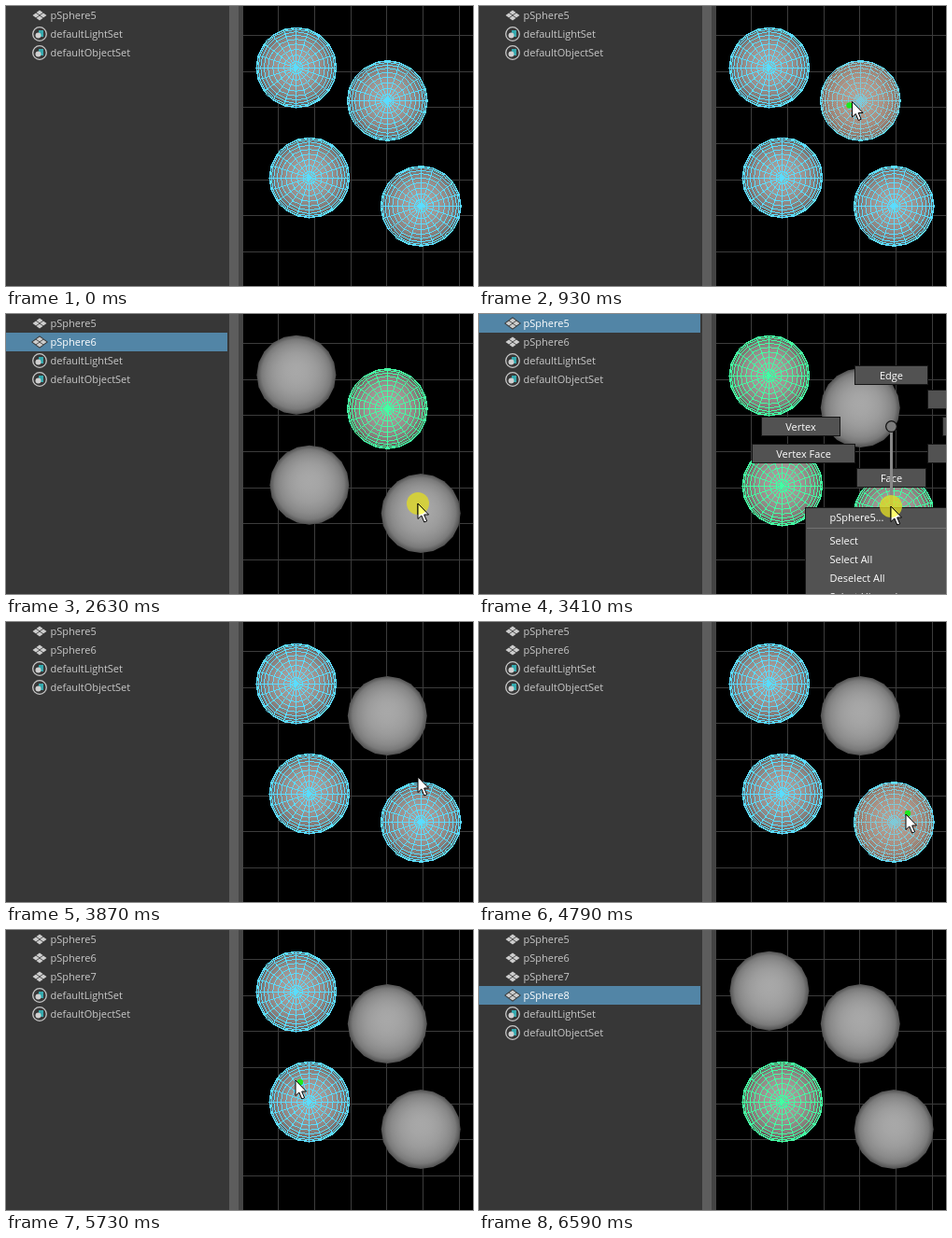
An HTML page with a canvas for the animation above (8610 ms loop, 500 by 300 pixels).

```html
<!DOCTYPE html>
<html lang="en">
<head>
<meta charset="utf-8">
<title>Extracting spheres</title>
<style>
html, body { margin: 0; width: 100%; height: 100%; overflow: hidden; background: #000; }
canvas { display: block; }
</style>
</head>
<body>
<canvas id="stage" width="500" height="300"></canvas>
<script>
const ctx = document.getElementById('stage').getContext('2d');
const LOOP = 8610, TAU = Math.PI * 2, SIDES = 20, RADIUS = 43;
const BLUE = '#5bdcff', GREEN = '#43ffa3', SELECT = '#5285a6', EDGE = '#161616';

// Each round: enter component mode, hover a face, pick the shell, extract it.
const ROUNDS = [
  { ball: 1, mode: 0, hover: 620, pick: 860, pull: 1620, spot: [-3, 4] },
  { ball: 3, mode: 3870, hover: 4100, pick: 4400, pull: 4870, spot: [2, -1] },
  { ball: 2, mode: 5640, hover: 5640, pick: 5890, pull: 6590, spot: [5, 2] }
];
const RESELECT = 2700, MENU_OPEN = 3090, MENU_CLOSE = 3870;

const MOVES = [
  { start: 380, end: 620, from: [489, 130], to: [399.5, 102.5] },
  { start: 2320, end: 2460, from: [489, 212], to: [441, 203] },
  { start: 3410, end: 3730, from: [441, 206], to: [441, 166] },
  { start: 3870, end: 4100, from: [441, 166], to: [457, 206] },
  { start: 5190, end: 5410, from: [247, 190], to: [302, 176] },
  { start: 5640, end: 5710, from: [306, 168], to: [310, 161] },
  { start: 6040, end: 6110, from: [310, 178], to: [310, 195] }
];
const PRESSES = [[790, 930], [2630, 2700], [3010, 3870], [4250, 4480], [5810, 5890]];

const mix = (a, b, u) => a + (b - a) * u;

function box(x, y, w, h, fill) {
  ctx.fillStyle = fill;
  ctx.fillRect(x, y, w, h);
}

function disc(x, y, r, fill) {
  ctx.beginPath();
  ctx.arc(x, y, r, 0, TAU);
  ctx.fillStyle = fill;
  ctx.fill();
}

function label(text, x, y, fill, align = 'left') {
  ctx.font = '11px "Open Sans", sans-serif';
  ctx.textAlign = align;
  ctx.fillStyle = fill;
  ctx.fillText(text, x, y);
}

function poly(points) {
  ctx.beginPath();
  for (const [x, y] of points) ctx.lineTo(x, y);
  ctx.closePath();
}

const corner = (cx, cy, r, i) => {
  const a = i * TAU / SIDES;
  return [cx + r * Math.cos(a), cy + r * Math.sin(a)];
};

// Hard-edged line of whole pixels
function pixelLine(path, [x0, y0], [x1, y1]) {
  const n = Math.ceil(Math.max(Math.abs(x1 - x0), Math.abs(y1 - y0))) || 1;
  for (let i = 0; i <= n; i++)
    path.rect(Math.floor(mix(x0, x1, i / n)), Math.floor(mix(y0, y1, i / n)), 1, 1);
}

function wirePath(x, y) {
  const path = new Path2D();
  for (let i = 0; i < SIDES; i++) {
    pixelLine(path, [x, y], corner(x, y, RADIUS, i));
    for (let k = 1; k <= 10; k++) {
      const r = RADIUS * Math.sin(k * TAU / 40);
      pixelLine(path, corner(x, y, r, i), corner(x, y, r, i + 1));
    }
  }
  return path;
}

function stipplePath(cx, cy) {
  const path = new Path2D(), x0 = Math.round(cx), y0 = Math.round(cy);
  for (let dy = -RADIUS; dy < RADIUS; dy++)
    for (let dx = -RADIUS; dx < RADIUS; dx++)
      if ((dx + dy) % 2 === 0 && Math.hypot(dx, dy) < RADIUS - 1) path.rect(x0 + dx, y0 + dy, 1, 1);
  return path;
}

const BALLS = [[310.9, 66], [408.3, 101.4], [324.9, 184], [444.2, 214.4]]
  .map(([x, y]) => ({ x, y, wire: wirePath(x, y), stipple: stipplePath(x, y) }));

function drawBall({ x, y, wire, stipple }, look) {
  const plain = look === 'plain';
  const cy = plain ? y - 0.8 : y, r = plain ? 42.5 : RADIUS;
  const shade = ctx.createRadialGradient(x, cy - 5, 0, x, cy, r);
  for (let d = 0; d <= 1; d += 0.125) {
    const v = 78 + 90 * Math.sqrt(1 - d * d);
    shade.addColorStop(d, plain ? `rgb(${v},${v},${v})` : `rgb(${v},${v - 8},${v - 11})`);
  }
  poly(Array.from({ length: SIDES }, (_, i) => corner(x, cy, r, i)));
  ctx.fillStyle = shade;
  ctx.fill();
  if (plain) return;
  ctx.fillStyle = look === 'object' ? GREEN : BLUE;
  ctx.fill(wire);
  if (look === 'picked') {
    ctx.fillStyle = 'rgba(222,150,108,.55)';
    ctx.fill(stipple);
  }
}

function meshIcon(y) {
  const diamond = (x, c, w, h, fill) => {
    poly([[x - w, c], [x, c - h], [x + w, c], [x, c + h]]);
    ctx.fillStyle = fill;
    ctx.fill();
  };
  diamond(36, y, 9, 6.8, '#373737');
  for (const [dx, dy] of [[0, -3], [-4, 0], [4, 0], [0, 3]])
    diamond(36 + dx, y + dy, 3.5, 2.6, '#cdcdcd');
}

function setIcon(y) {
  ctx.beginPath();
  ctx.arc(36, y, 7.3, 0, TAU);
  ctx.strokeStyle = '#c8c8c8';
  ctx.lineWidth = 1.3;
  ctx.stroke();
  box(35, y - 4, 5, 7, '#35a9ae');
  disc(34.5, y + 1.5, 3, '#d0d0d0');
}

function outliner(meshes, selected) {
  box(0, 0, 239, 300, '#373737');
  box(239, 0, 10, 300, '#5d5d5d');
  box(249, 0, 5, 300, '#444');
  const names = Array.from({ length: meshes }, (_, i) => 'pSphere' + (5 + i));
  names.push('defaultLightSet', 'defaultObjectSet');
  names.forEach((name, i) => {
    const y = i * 20 + 10;
    if (i === selected) box(0, y - 10, 237, 20, SELECT);
    (i < meshes ? meshIcon : setIcon)(y);
    label(name, 47.5, y + 4, i === selected ? '#fff' : '#c8c8c8');
  });
}

function grid() {
  box(254, 0, 246, 300, '#000');
  for (let i = 0; i < 7; i++) {
    box(Math.round(291 + i * 38.75), 0, 1, 300, '#3c3c3c');
    box(254, Math.floor(31.3 + i * 38.7), 246, 1, '#3c3c3c');
  }
}

function item(text, x, y, w, fill = '#525252') {
  box(x - 1, y - 1, w + 2, 21, EDGE);
  box(x, y, w, 19, fill);
  label(text, x + w / 2, y + 14, '#fff', 'center');
}

function markingMenu(tipY) {
  item('Edge', 403, 56, 77);
  item('Vertex', 303, 111, 83);
  item('Vertex Face', 293, 140, 109);
  item('Face', 405, 166, 73, tipY < 186 ? SELECT : undefined);
  item('', 481, 82, 40);
  item('', 497, 111, 40);
  item('', 481, 140, 40);

  box(349, 207, 151, 93, EDGE);
  box(350, 208, 150, 92, '#525252');
  box(351, 229, 149, 1, '#727272');
  ['pSphere5...', 'Select', 'Select All', 'Deselect All', 'Select Hierarchy'].forEach((text, i) =>
    label(text, 375.5, i ? 227 + i * 20 : 222, '#fff'));

  box(440, 125, 3, tipY - 125, '#888');
  disc(441.5, 120.5, 6.5, '#111');
  disc(441.5, 120.5, 5.2, '#7c7c7c');
}

function arrow(x, y, fill) {
  poly([[0, 0], [0, 16.5], [3.8, 13], [6.8, 20], [9.6, 18.8], [6.7, 12], [11.5, 12]]
    .map(([dx, dy]) => [x + dx, y + dy]));
  ctx.fillStyle = fill;
  ctx.fill();
  ctx.strokeStyle = '#000';
  ctx.lineWidth = 1;
  ctx.stroke();
}

function drawPointer({ x, y }, pressed) {
  if (pressed) disc(x, y, 12, 'rgba(222,218,38,.8)');
  arrow(x, y, '#fff');
  if (!pressed) return;
  ctx.save();
  ctx.beginPath();
  ctx.arc(x, y, 12, 0, TAU);
  ctx.clip();
  arrow(x, y, '#ffff70');
  ctx.restore();
}

// The pointer glides in steps of about 75 ms and leaves with each extraction.
function pointerAt(t) {
  const move = MOVES.findLast(m => m.start <= t);
  if (!move || ROUNDS.some(r => r.pull > move.start && r.pull <= t)) return null;
  const { start, end, from, to } = move;
  const steps = Math.round((end - start) / 75);
  const u = Math.min(1, Math.floor(steps * (t - start) / (end - start)) / steps);
  return { x: mix(from[0], to[0], u), y: mix(from[1], to[1], u) };
}

function sceneAt(t) {
  const round = ROUNDS.findLast(r => r.mode <= t);
  const pulled = ROUNDS.filter(r => r.pull <= t).map(r => r.ball);
  const regrouped = t >= RESELECT && t < MENU_CLOSE;
  const extracted = t >= round.pull;
  const look = i => {
    if (extracted && !regrouped) return i === round.ball ? 'object' : 'plain';
    if (pulled.includes(i)) return 'plain';
    if (regrouped) return 'object';
    return i === round.ball && t >= round.pick ? 'picked' : 'component';
  };
  const selected = regrouped ? 0 : extracted ? pulled.length : -1;
  return { round, look, selected, meshes: 1 + pulled.length };
}

function draw(t) {
  const { round, look, selected, meshes } = sceneAt(t);
  const tip = pointerAt(t);
  grid();
  BALLS.forEach((ball, i) => drawBall(ball, look(i)));
  outliner(meshes, selected);
  if (t >= MENU_OPEN && t < MENU_CLOSE) markingMenu(tip.y);
  if (!tip) return;
  if (t >= round.hover && t < round.pull)
    disc(tip.x + round.spot[0], tip.y + round.spot[1], 3.2, '#1ee81e');
  drawPointer(tip, PRESSES.some(([down, up]) => t >= down && t < up));
}

const start = performance.now();
function tick() {
  draw((performance.now() - start) % LOOP);
  requestAnimationFrame(tick);
}
tick();
</script>
</body>
</html>
```
